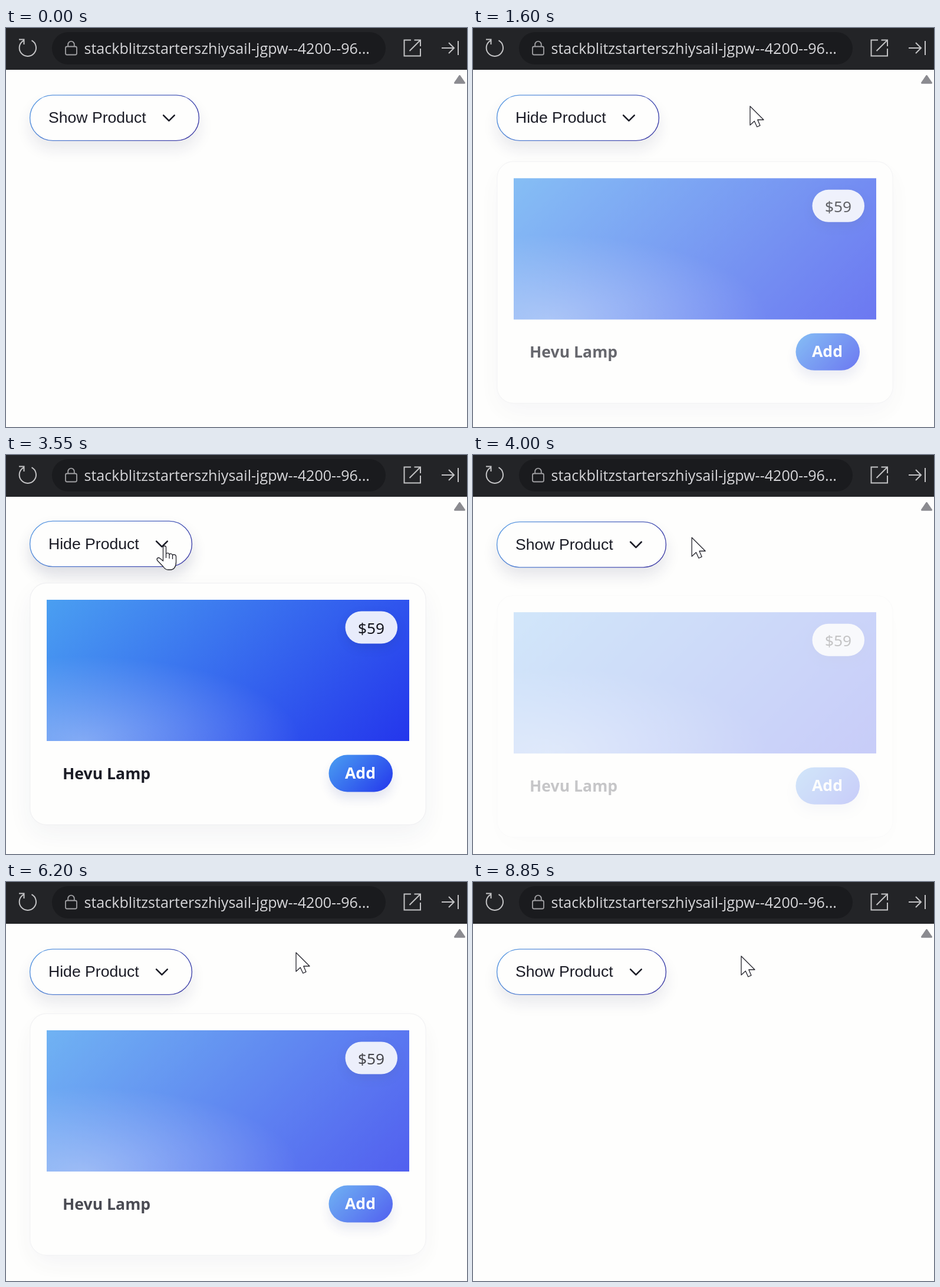
Write an HTML page that moves like this. It is 782 by 678 pixels and loops after 9200 ms.

```html
<!DOCTYPE html>
<html lang="en">
<head>
<meta charset="utf-8">
<title>Product toggle</title>
<style>
  html, body { margin: 0; width: 100%; height: 100%; overflow: hidden; background: #fefefd; }
  svg { display: block; }
  .ui { font-family: "Open Sans", "Noto Sans", sans-serif; }
  .btn { font: 26.6px "Liberation Sans", Arial, sans-serif; fill: #1b1c26; }
  .line { fill: none; stroke: #c3c3c5; stroke-width: 2; }
  .cursor { fill: #fff; stroke: #24242c; stroke-width: 1.3; stroke-linejoin: round; }
</style>
</head>
<body>
<svg width="782" height="678" viewBox="0 0 782 678">
  <defs>
    <linearGradient id="edge" gradientUnits="userSpaceOnUse" x1="92" y1="61" x2="275" y2="244">
      <stop stop-color="#5c9fe6"/><stop offset="1" stop-color="#403aa4"/>
    </linearGradient>
    <linearGradient id="photo" gradientUnits="userSpaceOnUse" x1="162.7" y1="152.2" x2="590.2" y2="579.7">
      <stop stop-color="#4a9ff1"/><stop offset="1" stop-color="#2436ec"/>
    </linearGradient>
    <linearGradient id="add" gradientUnits="userSpaceOnUse" x1="559.5" y1="498.5" x2="644.5" y2="583.5">
      <stop stop-color="#4a9ff1"/><stop offset="1" stop-color="#2436ec"/>
    </linearGradient>
    <radialGradient id="glow" cx=".1" cy="1" r=".6">
      <stop stop-color="#fff" stop-opacity=".36"/><stop offset="1" stop-color="#fff" stop-opacity="0"/>
    </radialGradient>
    <filter id="soft" filterUnits="userSpaceOnUse" x="-60" y="0" width="900" height="800">
      <feGaussianBlur stdDeviation="13"/>
    </filter>
    <filter id="wide" filterUnits="userSpaceOnUse" x="-60" y="0" width="900" height="800">
      <feGaussianBlur stdDeviation="22"/>
    </filter>
    <filter id="small" filterUnits="userSpaceOnUse" x="500" y="200" width="240" height="440">
      <feGaussianBlur stdDeviation="9"/>
    </filter>
  </defs>

  <rect width="782" height="678" fill="#fefefd"/>

  <g id="button">
    <rect id="shade" x="40" y="128" width="288" height="78" rx="39" fill="#1c2450" filter="url(#soft)"/>
    <rect id="pill" x="40.6" y="114.1" width="286.8" height="77.3" rx="38.6" fill="#fefefd" stroke="url(#edge)" stroke-width="1.4"/>
    <text id="label" class="btn" x="72" y="161.3">Show Product</text>
    <path id="chevron" d="M-9.3 148.3L0 157.6L9.3 148.3" fill="none" stroke="#1b1c26" stroke-width="2.6" stroke-linecap="round" stroke-linejoin="round"/>
  </g>

  <g id="card" class="ui" opacity="0">
    <rect x="41" y="234" width="671" height="410" rx="28" fill="#28305f" opacity=".05" filter="url(#wide)"/>
    <rect x="40.8" y="217.6" width="671.4" height="410.8" rx="28" fill="#fefefd" stroke="#f0f0f2" stroke-width="1.2"/>
    <rect x="69" y="246" width="615" height="240" fill="url(#photo)"/>
    <rect x="69" y="246" width="615" height="240" fill="url(#glow)"/>
    <rect x="576" y="272" width="88" height="55" rx="27.5" fill="#141c50" opacity=".13" filter="url(#small)"/>
    <rect x="575.5" y="265.5" width="88.5" height="55" rx="27.5" fill="#fff" fill-opacity=".89"/>
    <text x="597" y="304" font-family="Noto Sans, sans-serif" font-size="26.3" font-weight="500" fill="#14151c">$59</text>
    <text x="96" y="551" font-size="26.6" font-weight="700" fill="#1b1c26">Hevu Lamp</text>
    <rect x="548" y="522" width="108" height="62" rx="31" fill="#28389c" opacity=".12" filter="url(#small)"/>
    <rect x="547.5" y="509.5" width="108.5" height="63" rx="31.5" fill="url(#add)"/>
    <text x="575" y="550" font-size="26.6" font-weight="700" fill="#fff">Add</text>
  </g>

  <path d="M761.5 93.3L769.5 81.5L777.5 93.3Z" fill="#8b8b90" stroke="#8b8b90" stroke-width="3" stroke-linejoin="round"/>

  <g class="ui">
    <rect width="782" height="71" fill="#232427"/>
    <rect x="78" y="7" width="566" height="55" rx="27.5" fill="#1a1b1e"/>
    <path class="line" d="M43.5 21.2A14.2 14.2 0 1 1 29.8 21.4M22 19.5H30.5V28"/>
    <path class="line" d="M103.5 31.5H117.5Q120 31.5 120 34V43Q120 45.5 117.5 45.5H103.5Q101 45.5 101 43V34Q101 31.5 103.5 31.5ZM105.2 31V28A5.3 5.3 0 0 1 115.8 28V31" style="stroke:#a0a0a3;stroke-width:1.8"/>
    <text x="132.5" y="44" font-size="25.1" fill="#d6d6d9">stackblitzstarterszhiysail-jgpw--4200--96...</text>
    <path class="line" d="M687 20.5H675.5V47.5H703V35M684.5 39L703 20.5M692.5 20.5H703V31"/>
    <path class="line" d="M739 34H760M751 25L760 34L751 43M767 22V46"/>
  </g>

  <path id="arrow" class="cursor" d="M0 0V32L7.3 25.3L11.8 35L17 32.7L12.8 23H23Z"/>
  <g id="hand" class="cursor">
    <path d="M-2.5 2A2.5 2.5 0 0 1 2.5 2V13C3.5 11 7.5 11 8 14C9 12 13 12.5 13.5 15.2C15 13.5 19.5 14 19.5 18V27C19.5 35 15.5 40 10 40H6C2 40 0 38 -2 35L-12 24.5C-14.5 21 -11 18 -8 20.5L-2.5 25Z"/>
    <path d="M2.5 13V20M8 14V21M13.5 15V22" fill="none"/>
  </g>
</svg>
<script>
  const LOOP = 9200, FADE = 900, DROP = 28;
  const $ = id => document.getElementById(id);
  const clamp = v => Math.min(1, Math.max(0, v));

  // time, x, y of the pointer tip
  const path = [
    [200, 575, 388], [850, 282, 150], [1260, 278, 150], [1600, 470, 133], [1900, 492, 128],
    [2900, 492, 128], [3400, 269, 155], [3680, 269, 155], [4300, 463, 127],
    [5050, 463, 127], [5500, 280, 150], [5780, 280, 150], [6200, 492, 120],
    [6950, 492, 120], [7450, 276, 147], [7680, 276, 147], [8400, 455, 126]
  ];
  // click time, card open afterwards
  const clicks = [[1250, 1], [3590, 0], [5765, 1], [7590, 0]];

  // cubic-bezier(.25, .1, .25, 1)
  function ease(p) {
    let lo = 0, hi = 1, u = p;
    const curve = (a, b) => 3 * u * (1 - u) * (1 - u) * a + 3 * u * u * (1 - u) * b + u * u * u;
    for (let i = 0; i < 20; i++) {
      u = (lo + hi) / 2;
      if (curve(.25, .25) < p) lo = u; else hi = u;
    }
    return curve(.1, 1);
  }

  function pointer(t) {
    const i = path.findIndex(k => k[0] > t);
    if (i < 0) return path[path.length - 1].slice(1);
    if (i === 0) return null;
    const [t0, x0, y0] = path[i - 1], [t1, x1, y1] = path[i];
    let s = (t - t0) / (t1 - t0);
    s = s * s * (3 - 2 * s);
    return [x0 + (x1 - x0) * s, y0 + (y1 - y0) * s];
  }

  const lastClick = t => clicks.filter(c => c[0] <= t).pop();

  function hovers(t) {
    const p = pointer(t), c = lastClick(t);
    if (!p) return false;
    return p[0] > 40 && p[0] < (c && c[1] ? 316 : 328) && p[1] > 113 && p[1] < 191;
  }

  // hover strength: share of the last 150 ms spent over the button
  function lift(t) {
    let n = 0;
    for (let i = 0; i < 10; i++) n += hovers(t - i * 15);
    return n / 10;
  }

  function place(el, p, on) {
    el.setAttribute("visibility", on ? "visible" : "hidden");
    if (on) el.setAttribute("transform", `translate(${p[0]} ${p[1]})`);
  }

  function draw(t) {
    const click = lastClick(t), open = click ? click[1] : 0;
    const k = click ? ease(clamp((t - click[0]) / FADE)) : 1;
    const shown = open ? k : 1 - k;
    const width = open ? 276 : 288;
    const up = lift(t);

    $("label").textContent = open ? "Hide Product" : "Show Product";
    $("pill").setAttribute("width", width - 1.2);
    $("shade").setAttribute("width", width);
    $("shade").setAttribute("opacity", .09 + .06 * up);
    $("chevron").setAttribute("transform", `translate(${width - 11.6} 0)`);
    $("button").setAttribute("transform", `translate(0 ${-1.75 * up})`);

    $("card").setAttribute("opacity", shown);
    $("card").setAttribute("transform", `translate(0 ${DROP * (1 - shown)})`);

    const p = pointer(t), over = hovers(t);
    place($("arrow"), p, p && !over);
    place($("hand"), p, p && over);
  }

  const start = performance.now();
  function tick() {
    draw((performance.now() - start) % LOOP);
    requestAnimationFrame(tick);
  }
  tick();
</script>
</body>
</html>
```
